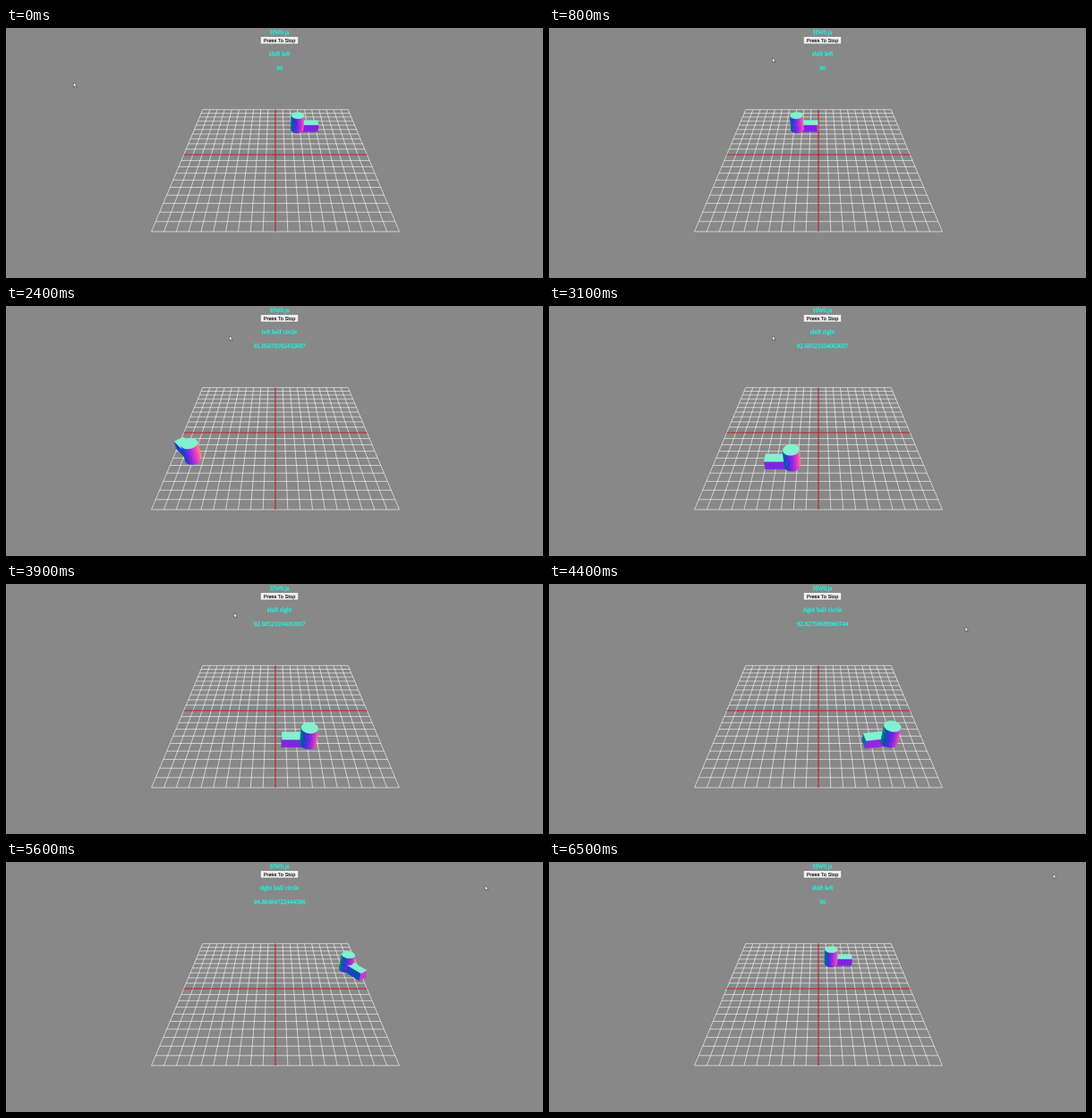
These frames come from a looping animation (600 px wide and 280 px high, 6600 ms). An HTML page with a canvas:

```html
<!DOCTYPE html>
<html lang="en">
<head>
<meta charset="utf-8">
<title>HW0.js</title>
<style>
  html, body { margin: 0; width: 100%; height: 100%; overflow: hidden; background: #888; }
  canvas, svg { position: absolute; left: 0; top: 0; display: block; }
  text { font: 7px "Liberation Serif", "Times New Roman", serif; fill: #1cf5e0; stroke: #1cf5e0;
         stroke-width: .28; text-anchor: middle; text-rendering: geometricPrecision; }
  .btn { font: 5.75px "Liberation Sans", Arial, sans-serif; fill: #000; stroke: #000; stroke-width: .1; }
</style>
</head>
<body>
<canvas id="stage" width="600" height="280"></canvas>
<svg width="600" height="280" viewBox="0 0 600 280">
  <text x="305.7" y="7.2">HW0.js</text>
  <rect x="284.3" y="9.4" width="42.4" height="8.5" rx="1" fill="#efefef" stroke="#6c6c6c" stroke-width=".6"/>
  <text class="btn" x="305.5" y="15.7">Press To Stop</text>
  <text id="label" x="305.5" y="31.4"></text>
  <text id="angle" x="305.7" y="46.5"></text>
  <path id="cursor" d="M0 0V5L1.2 4L2 5.8L2.8 5.4L2.1 3.7H3.6Z" fill="#fff" stroke="#333" stroke-width=".5"/>
</svg>
<script>
const LOOP = 6600, STEP = 100;
const { PI, sin, cos, sqrt, floor } = Math;
const el = id => document.getElementById(id);
const ctx = el('stage').getContext('2d');

// Camera looks down at the middle of a grid whose half size is 1.
const CX = 301, CY = 141.9, FOCAL = 307.8, DIST = 3.006, TILT_S = 0.622, TILT_C = 0.783;
// The body is a long box; the cylinder stands AHEAD of its pivot.
const RADIUS = 0.075, TALL = 0.2, AHEAD = 0.1, BOX_H = 0.1, BOX_W = 0.05, BOX_END = 0.25;

function project([x, y, z]) {
  const k = FOCAL / (DIST - z * TILT_C - y * TILT_S);
  return [CX + x * k, CY + (z * TILT_S - y * TILT_C) * k];
}

// Colour of a surface from its normal in view space, slightly saturated.
function shade(x, y, z) {
  const n = [x * 1.1, (y * TILT_C - z * TILT_S) * 1.15, y * TILT_S + z * TILT_C];
  return `rgb(${n.map(v => Math.max(0, Math.min(255, Math.round(127.5 * (v + 1)))))})`;
}

function line(a, b, color, width) {
  ctx.strokeStyle = color;
  ctx.lineWidth = width;
  ctx.beginPath();
  ctx.moveTo(...project(a));
  ctx.lineTo(...project(b));
  ctx.stroke();
}

// Fills a polygon if it faces the viewer.
function face(points, color) {
  const p = points.map(project);
  let area = 0;
  p.forEach(([x, y], i) => {
    const [u, v] = p[(i + 1) % p.length];
    area += x * v - u * y;
  });
  if (area <= 0) return;
  ctx.beginPath();
  p.forEach(q => ctx.lineTo(...q));
  ctx.closePath();
  ctx.fillStyle = ctx.strokeStyle = color;
  ctx.lineWidth = 0.4;
  ctx.fill();
  ctx.stroke();
}

function drawGrid() {
  const white = 'rgba(255,255,255,.78)', red = '#c4202c';
  for (let i = -10; i <= 10; i++) {
    if (!i) continue;
    const s = i / 10;
    line([s, 0, -1], [s, 0, 1], white, 0.75);
    line([-1, 0, s], [1, 0, s], white, 0.75);
  }
  line([-1, 0, 0], [1, 0, 0], red, 1);
  line([0, 0, -1], [0, 0, 1], red, 1.1);
}

function drawCylinder({ x, z }) {
  const n = 40, at = (i, y) => {
    const a = i / n * 2 * PI;
    return [x + RADIUS * cos(a), y, z + RADIUS * sin(a)];
  };
  const top = [];
  for (let i = 0; i < n; i++) {
    const mid = (i + 0.5) / n * 2 * PI;
    face([at(i + 1, 0), at(i + 1, TALL), at(i, TALL), at(i, 0)], shade(cos(mid), 0, sin(mid)));
    top.push(at(i, TALL));
  }
  face(top, shade(0, 1, 0));
}

// The part of the box that sticks out behind the cylinder.
function drawBox({ x, z, rot }) {
  const c = cos(rot), s = -sin(rot);
  const at = (u, y, v) => [x + u * c - v * s, y, z + u * s + v * c];
  const root = sqrt(RADIUS ** 2 - BOX_W ** 2), top = [];
  for (let i = 4; i >= -4; i--) {
    const v = BOX_W * i / 4;
    top.push(at(sqrt(RADIUS ** 2 - v * v), BOX_H, v));
  }
  const wall = (a, b, nx, nz) =>
    face([at(...a(BOX_H)), at(...b(BOX_H)), at(...b(0)), at(...a(0))], shade(nx, 0, nz));
  const near = y => [root, y, BOX_W], nearEnd = y => [BOX_END, y, BOX_W];
  const far = y => [root, y, -BOX_W], farEnd = y => [BOX_END, y, -BOX_W];
  wall(near, nearEnd, -s, c);
  wall(nearEnd, farEnd, c, s);
  wall(farEnd, far, s, -c);
  face([...top, at(...farEnd(BOX_H)), at(...nearEnd(BOX_H))], shade(0, 1, 0));
}

// Linear track through rows of [time, ...values].
function track(rows, t) {
  let i = 0;
  while (i < rows.length - 2 && t >= rows[i + 1][0]) i++;
  const a = rows[i], b = rows[i + 1];
  const k = Math.min(1, Math.max(0, (t - a[0]) / (b[0] - a[0])));
  return a.slice(1).map((v, j) => k === 1 ? b[j + 1] : v + (b[j + 1] - v) * k);
}

const TURN_LEFT = 1317, GO_RIGHT = 2879, TURN_RIGHT = 4317, GO_LEFT = 6145;
const SPEED = 0.695 / 1000;

const ANGLES = [
  [TURN_LEFT, 90], [1600, 90.48565770342388], [2400, 91.85679192432697],
  [GO_RIGHT, 92.68523104063007], [TURN_RIGHT, 92.68523104063007],
  [4900, 93.68523653447087], [5600, 94.88484722444366], [GO_LEFT, 95.8191626]
];
const POINTER = [
  [0, 75.5, 61.1], [300, 120, 52], [800, 249.5, 33.4], [3600, 249.5, 33.4],
  [3900, 254.8, 32.6], [4200, 459, 46], [4500, 468, 49], [4900, 440, 48],
  [5200, 470, 44], [5600, 535.3, 26.5], [6000, 558, 15], [6300, 563.3, 13.4]
];

// Stage of the walk at a time: label, shown angle, pivot and heading.
// The angle is in radians and starts at 90, so the first turn skips ahead.
function walk(t) {
  const angle = t < GO_LEFT ? track(ANGLES, t)[0] : 90;
  if (t < TURN_LEFT)
    return { label: 'shift left', angle, x: track([[0, 0.366], [TURN_LEFT, -0.5]], t)[0], z: -0.5, rot: 0 };
  if (t < GO_RIGHT) {
    const a = angle - 28.5 * PI;
    return { label: 'left half circle', angle, x: -0.5 - 0.5 * sin(a), z: -0.5 * cos(a), rot: a };
  }
  if (t < TURN_RIGHT)
    return { label: 'shift right', angle, x: -0.5 + (t - GO_RIGHT) * SPEED, z: 0.5, rot: PI };
  if (t < GO_LEFT) {
    const a = angle - 29.5 * PI;
    return { label: 'right half circle', angle, x: 0.5 + 0.5 * sin(a), z: 0.5 * cos(a), rot: PI + a };
  }
  return { label: 'shift left', angle, x: 0.5 - (t - GO_LEFT) * SPEED, z: -0.5, rot: 0 };
}

function draw(t) {
  ctx.fillStyle = '#888';
  ctx.fillRect(0, 0, 600, 280);
  drawGrid();

  const { label, angle, x, z, rot } = walk(t);
  const body = { x: x - AHEAD * cos(rot), z: z + AHEAD * sin(rot), rot };
  const boxInFront = -sin(rot) > 0.25;
  if (!boxInFront) drawBox(body);
  drawCylinder(body);
  if (boxInFront) drawBox(body);

  el('label').textContent = label;
  el('angle').textContent = angle;
  el('cursor').setAttribute('transform', `translate(${track(POINTER, t)})`);
}

let start = null;
function tick(now) {
  if (start === null) start = now;
  draw(floor((now - start) % LOOP / STEP) * STEP);
  requestAnimationFrame(tick);
}
draw(0);
requestAnimationFrame(tick);
</script>
</body>
</html>
```
